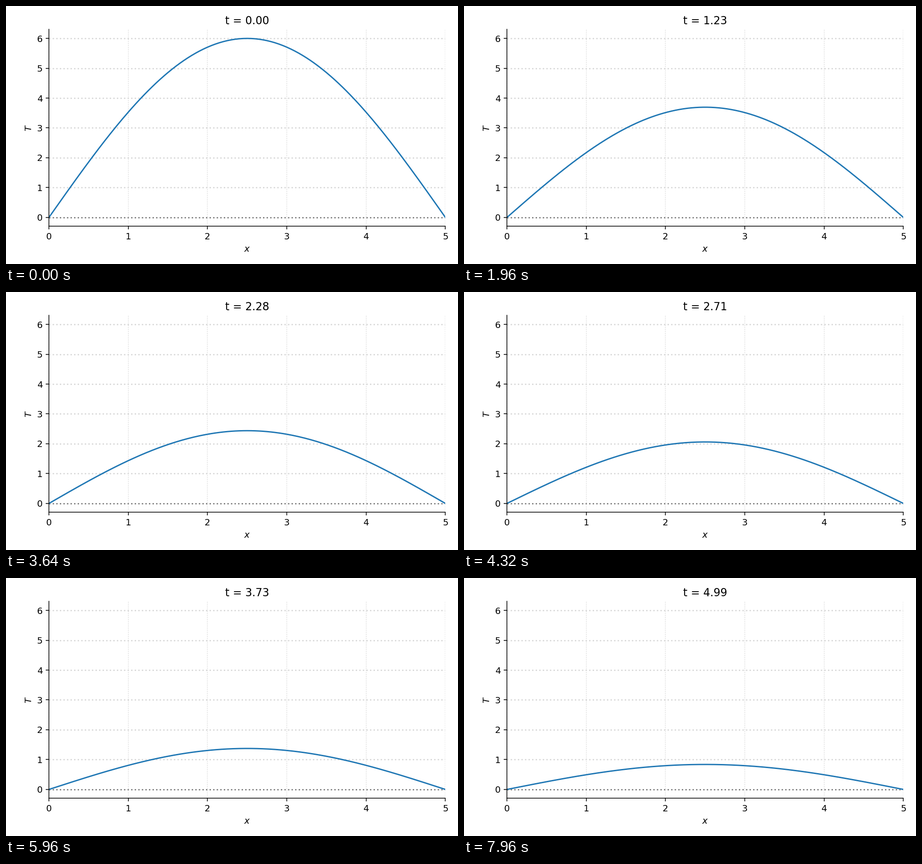
Animation, 990 px wide and 566 px high, one loop 8 s. Source, as a matplotlib script:

```python
import numpy as np
import matplotlib.pyplot as plt
from matplotlib.animation import FuncAnimation

W, H = 990, 566
DPI = W / 7  # seven inches wide
FRAMES, INTERVAL = 200, 40
LENGTH, PEAK = 5.0, 6.0
DT = 10 / 399
DECAY = (np.pi / LENGTH) ** 2

plt.rcParams["font.family"] = "DejaVu Sans"

# The small surplus keeps the pixel size from being rounded down
fig = plt.figure(figsize=((W + 0.01) / DPI, (H + 0.01) / DPI), dpi=DPI,
                 facecolor="white")

# Axes edges in pixels, measured from the top left corner
left, right, top, bottom = 94, 962.4, 51.5, 483.5
ax = fig.add_axes([left / W, 1 - bottom / H, (right - left) / W, (bottom - top) / H])
ax.set_xlim(0, LENGTH)
ax.set_ylim(-0.05 * PEAK, 1.05 * PEAK)
ax.set_xticks(range(6))
ax.set_yticks(range(7))
ax.spines[["top", "right"]].set_visible(False)
ax.set_xlabel("$x$")
ax.set_ylabel("$T$")

ax.set_axisbelow(True)
ax.grid(axis="x", color="lightgray", linestyle=":", linewidth=0.8)
for level in range(1, 7):
    ax.axhline(level, color="0.85", linestyle=":", linewidth=1.5, zorder=1)
ax.axhline(0, color="gray", linestyle=":", linewidth=1.5, zorder=1.5)

x = np.linspace(0, LENGTH, 201)
mode = PEAK * np.sin(np.pi * x / LENGTH)
curve, = ax.plot(x, mode, color="tab:blue", linewidth=1.5)
title = ax.set_title("t = 0.00")


def update(frame):
    """Heat in a rod with cold ends: the first sine mode fades exponentially."""
    t = frame * DT
    curve.set_ydata(mode * np.exp(-DECAY * t))
    title.set_text(f"t = {t:.2f}")
    return curve, title


anim = FuncAnimation(fig, update, frames=FRAMES, interval=INTERVAL,
                     repeat=True, repeat_delay=0, blit=False)
plt.show()
```
